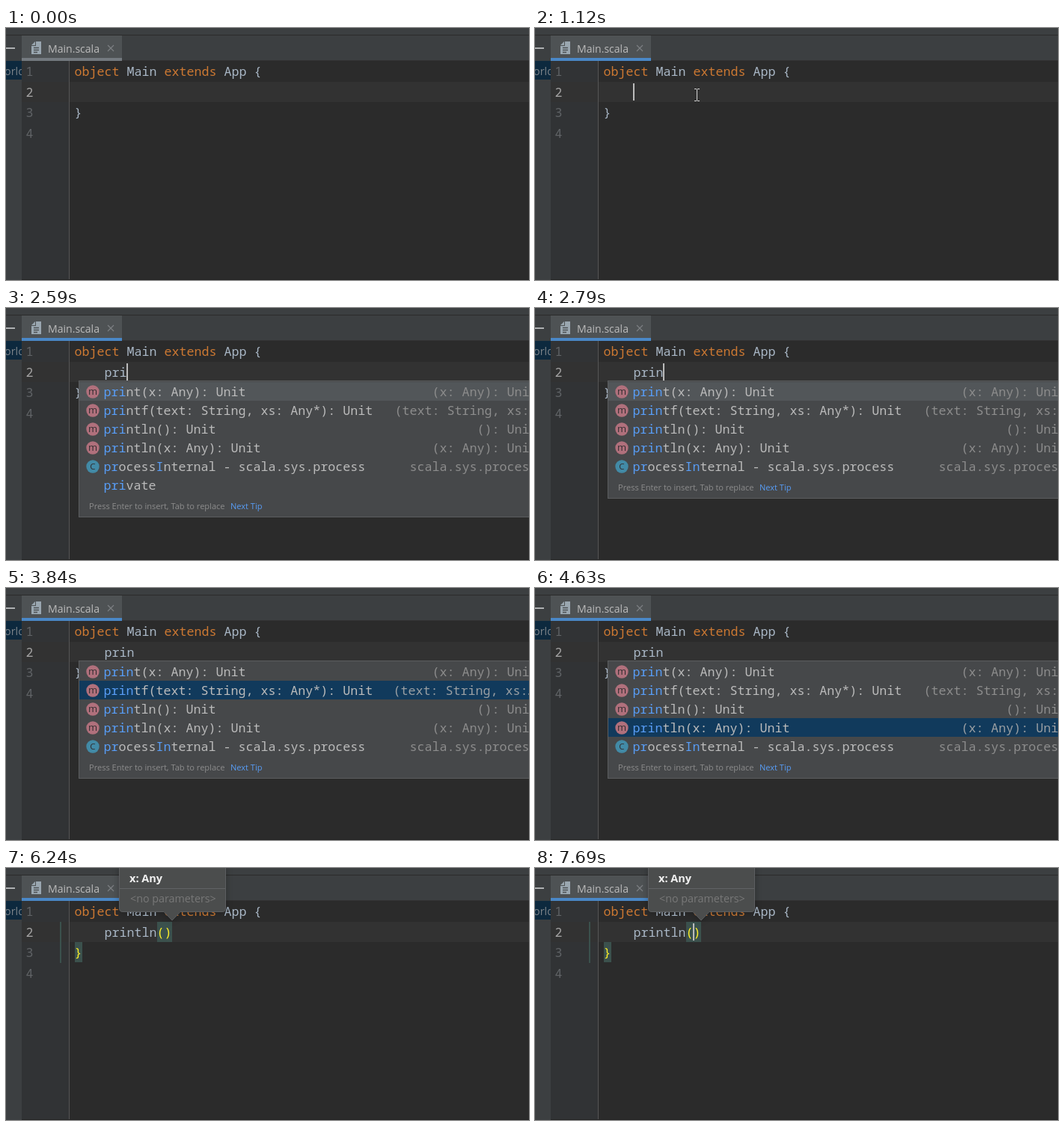
An HTML page for the animation above (8000 ms loop, 699 by 337 pixels).

```html
<!DOCTYPE html>
<html lang="en">
<head>
<meta charset="utf-8">
<title>Code completion</title>
<style>
html, body { margin: 0; width: 100%; height: 100%; overflow: hidden; background: #2b2b2b; }
svg { display: block; width: 699px; height: 337px; }
text { white-space: pre; }
.code { font: 16.667px "Noto Sans Mono", monospace; font-variant-ligatures: none; }
.ui { font-family: "Open Sans", "Noto Sans", sans-serif; }
</style>
</head>
<body>
<svg id="stage" viewBox="0 0 699 337" xmlns="http://www.w3.org/2000/svg"></svg>
<script>
const LOOP = 8000;
const FG = '#a9b7c6', KEYWORD = '#cc7832', MATCH = '#589df6';
const BRACE = '#ffef28', BRACE_BG = '#3b514d', PANEL = '#46484a';
const stage = document.getElementById('stage');

const esc = s => s.replace(/&/g, '&amp;').replace(/</g, '&lt;').replace(/>/g, '&gt;');
const rect = (x, y, w, h, fill, more = '') =>
  `<rect x="${x}" y="${y}" width="${w}" height="${h}" fill="${fill}" ${more}/>`;
const path = (d, fill, more = '') => `<path d="${d}" fill="${fill}" ${more}/>`;
const code = (x, y, s, fill, more = '') =>
  `<text class="code" x="${x}" y="${y}" fill="${fill}" ${more}>${esc(s)}</text>`;
const ui = (x, y, size, s, fill, more = '') =>
  `<text class="ui" x="${x}" y="${y}" font-size="${size}" fill="${fill}" ${more}>${esc(s)}</text>`;

// Last value whose start time has passed
const at = (t, steps) => steps.reduce((v, [start, value]) => t >= start ? value : v, null);

const TYPED = [[0, ''], [2190, 'p'], [2390, 'pr'], [2520, 'pri'], [2720, 'prin'], [5160, 'println()']];
const CARET = [[0, 0], [990, 1], [1520, 0], [2050, 1], [3640, 0], [4110, 1], [4630, 0],
  [5160, 1], [6170, 0], [6630, 1], [7160, 0], [7690, 1]];
const LIST = [[0, 0], [2590, 6], [2790, 5], [5090, 0]];
const PICK = [[0, 0], [3840, 1], [4040, 2], [4300, 3]];
const POINTER = [[800, [213, 84]], [930, [222, 87]], [990, [220, 86]], [1060, [216, 83]],
  [1120, [213, 81]], [1320, [213, 80]], [2250, null]];

function pointerAt(t) {
  if (t < 70) return null;
  if (t >= 800) return at(t, POINTER);
  const k = Math.floor((t - 70) / 73) / 10;
  const e = k * k * (3 - 2 * k);
  return [Math.round(542 - 329 * e), Math.round(275 - 191 * e)];
}

function frame(focused) {
  const line = (y, n, on) => code(26.5, y, n, on ? '#a4a3a3' : '#606366');
  return rect(0, 0, 699, 337, '#3c3f41')
    + rect(0, 9, 699, 1, '#2b2b2b')
    + rect(0, 26, 12, 2, '#afb1b3')
    + rect(0, 44, 21, 25, '#0d293e')
    + ui(-2, 63, 14.4, 'orld', '#7b8288')
    + rect(21, 10, 134, 30, '#4e5254')
    + rect(21, 40, 134, 4, focused ? '#4a88c7' : '#747a80')
    + path('M40 18H47V35H34V24H40Z', '#9aa7b0') + path('M34 23L39 18V23Z', '#9aa7b0')
    + path('M37 26.5H44M37 29.5H44M37 32.5H42', 'none', 'stroke="#4e5254" stroke-width="1.3"')
    + ui(56, 33, 14.05, 'Main.scala', '#bbbbbb')
    + path('M136 23L144 31M144 23L136 31', 'none', 'stroke="#7d8184" stroke-width="1.1"')
    + rect(155, 43, 544, 1, '#323232')
    + rect(21, 44, 64, 293, '#313335')
    + rect(85, 44, 614, 293, '#2b2b2b')
    + rect(21, 72, 678, 27, '#323232')
    + rect(84, 44, 1, 293, '#555555')
    + rect(21, 336, 678, 1, '#242424')
    + line(64, '1') + line(92, '2', true) + line(119, '3') + line(147, '4');
}

function source(typed) {
  const done = typed.endsWith(')');
  const word = done ? 'println' : typed;
  let s = code(91.5, 64, 'object', KEYWORD) + code(161.5, 64, 'Main', FG)
    + code(211.5, 64, 'extends', KEYWORD) + code(291.5, 64, 'App {', FG)
    + code(131.5, 92, word, FG);
  if (done) {
    s += rect(72, 72, 2, 55, BRACE_BG) + rect(202, 72, 20, 27, BRACE_BG)
      + rect(92, 99, 10, 27, BRACE_BG)
      + code(201.5, 92, '()', BRACE, 'font-weight="700"');
  }
  return s + code(91.5, 119, '}', done ? BRACE : FG, done ? 'font-weight="700"' : '');
}

// Name, tail text, icon letter
const ITEMS = [
  ['print(x: Any): Unit', '(x: Any): Unit', 'm'],
  ['printf(text: String, xs: Any*): Unit', '(text: String, xs:…', 'm'],
  ['println(): Unit', '(): Unit', 'm'],
  ['println(x: Any): Unit', '(x: Any): Unit', 'm'],
  ['processInternal - scala.sys.process', 'scala.sys.process', 'C'],
  ['private', '', '']
];

function icon(x, y, letter) {
  if (!letter) return '';
  const method = letter === 'm';
  return `<circle cx="${x}" cy="${y}" r="8.7" fill="${method ? '#b0707c' : '#428aa6'}"/>`
    + ui(x, y + (method ? 3.6 : 4.2), method ? 13 : 11.5, letter, '#302c2f', 'text-anchor="middle"');
}

function matched(name, y, prefix) {
  const inner = name.startsWith('processI');
  const head = inner ? 'pr' : prefix;
  let s = code(130.5, y, name, '#bbbbbb');
  const paint = (from, part) => {
    const x = 130.5 + from * 10;
    return code(x, y, part, MATCH);
  };
  if (!inner) return paint(0, head) + code(130.5 + head.length * 10, y, name.slice(head.length), '#bbbbbb');
  const part = prefix.length > 3 ? 'In' : 'I';
  return paint(0, head) + code(150.5, y, 'ocess', '#bbbbbb') + paint(7, part)
    + code(200.5 + part.length * 10, y, name.slice(7 + part.length), '#bbbbbb');
}

function completion(count, pick, prefix) {
  if (!count) return '';
  const bottom = 130 + 25 * count;
  let s = rect(97, 97, 620, bottom - 97, '#5b5d5f') + rect(98, 98, 620, bottom - 99, PANEL);
  s += rect(98, 99 + 25 * pick, 601, 25, pick ? '#113a5c' : '#525659');
  ITEMS.slice(0, count).forEach(([name, tail, letter], i) => {
    const y = 118 + 25 * i;
    const shift = pick === 1 && i === 1 ? 2 : 0;
    s += icon(116, y - 6, letter) + matched(name, y, prefix)
      + code(709.5 - tail.length * 10 - shift, y, tail, pick === i && i ? '#9a9fa3' : '#8c8c8c');
  });
  return s + ui(111, bottom - 11, 11.06, 'Press Enter to insert, Tab to replace', '#8c8c8c')
    + ui(300, bottom - 11, 11.06, 'Next Tip', MATCH);
}

function hint() {
  const shape = 'M151.5 -2V54Q151.5 58.5 156 58.5H211L222 70L233 58.5H289Q293.5 58.5 293.5 54V-2Z';
  return '<defs><filter id="blur" x="-20%" y="-40%" width="140%" height="180%">'
    + '<feGaussianBlur stdDeviation="5"/></filter></defs>'
    + path(shape, '#000', 'opacity=".3" filter="url(#blur)"')
    + path(shape, '#4b4d4d', 'stroke="#5c5e60"')
    + rect(152, 27, 141, 1, '#616365')
    + ui(165, 19, 14.5, 'x: Any', '#f0f0f0', 'font-weight="700"')
    + ui(166, 46, 14.3, '<no parameters>', '#787878');
}

function beam([x, y]) {
  return path(`M${x} ${y + .5}H${x + 3}M${x + 4} ${y + .5}H${x + 7}M${x + 3.5} ${y + 1}V${y + 16}`
    + `M${x} ${y + 16.5}H${x + 3}M${x + 4} ${y + 16.5}H${x + 7}`, 'none', 'stroke="#d4d4d4"');
}

function picture(t) {
  const typed = at(t, TYPED);
  const column = typed.endsWith(')') ? typed.length - 1 : typed.length;
  const pointer = pointerAt(t);
  return frame(t >= 990) + source(typed)
    + (at(t, CARET) ? rect(131 + 10 * column, 74, 2, 23, '#bbbbbb') : '')
    + completion(at(t, LIST), at(t, PICK), typed)
    + (t >= 6240 ? hint() : '')
    + (pointer ? beam(pointer) : '');
}

let shown = '';
const start = performance.now();
function draw(now) {
  const next = picture(Math.max(0, now - start) % LOOP);
  if (next !== shown) stage.innerHTML = shown = next;
  requestAnimationFrame(draw);
}
draw(start);
</script>
</body>
</html>
```
